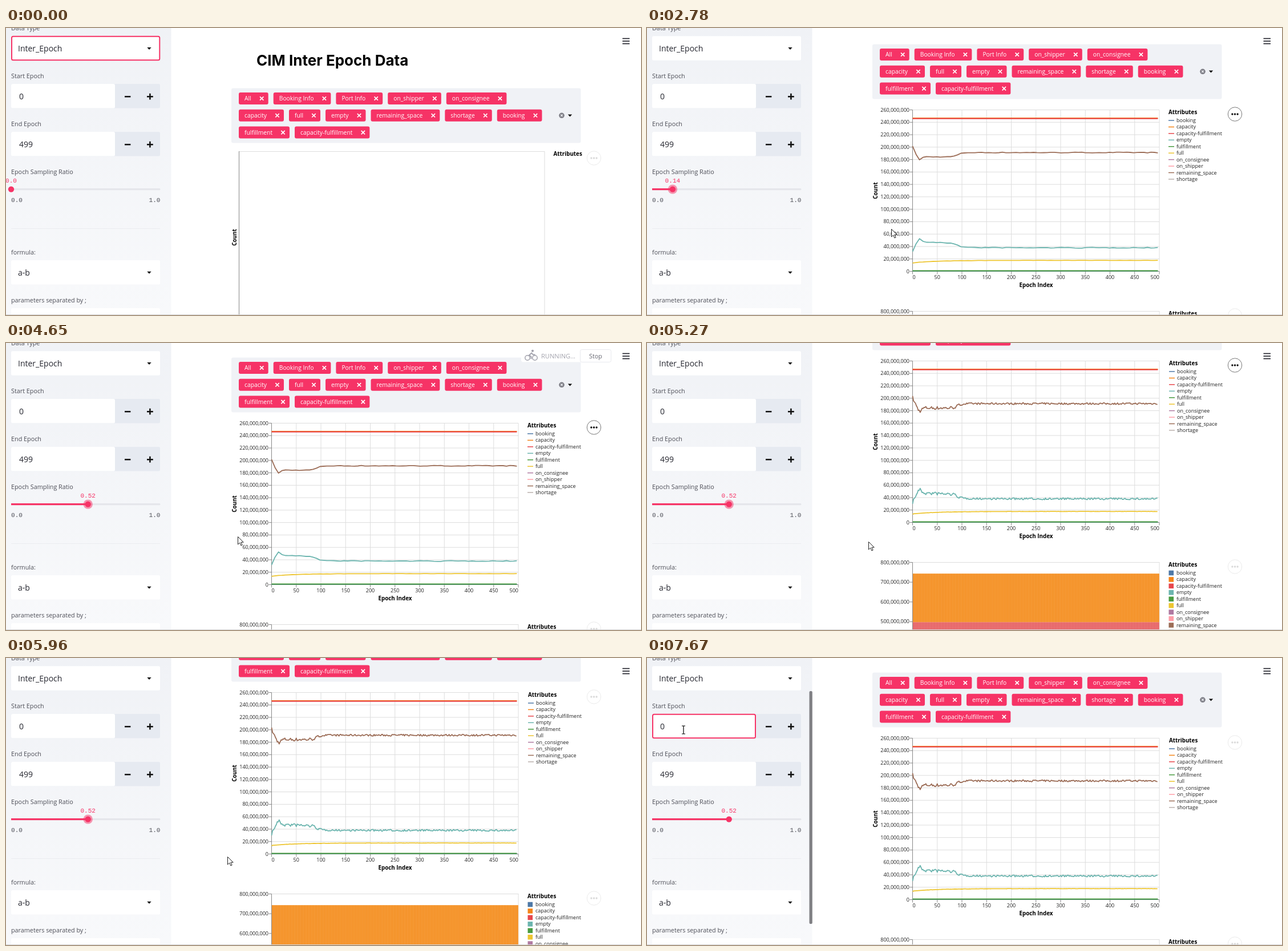
Write an HTML page that moves like this. It is 1113 by 503 pixels and loops after 8000 ms.

```html
<!DOCTYPE html>
<html lang="en">
<head>
<meta charset="utf-8">
<title>Epoch dashboard</title>
<style>
  html, body { margin: 0; width: 100%; height: 100%; overflow: hidden; background: #fff; }
  svg { display: block; width: 1113px; height: 503px; }
  text { font: 10.8px "Open Sans", sans-serif; fill: #262730; white-space: pre; }
  .title { font: 700 26px Inter, sans-serif; fill: #000; }
  .label { fill: #4d4e57; }
  .value { font-size: 14px; }
  .mono { font: 11.1px "Liberation Mono", monospace; fill: #4d4e57; }
  .chip { font-size: 10.3px; fill: #fff; }
  .tick { font-size: 9px; fill: #222; }
  .head { font-size: 9.8px; font-weight: 700; fill: #000; }
</style>
</head>
<body>
<svg id="stage" viewBox="0 0 1113 503"></svg>
<script>
const LOOP = 8000, RED = '#f63366', GREY = '#a3a3ad';
const stage = document.getElementById('stage');

const text = (x, y, s, cls, extra = '') => `<text x="${x}" y="${y}" class="${cls}" ${extra}>${s}</text>`;
const rect = (x, y, w, h, fill, r = 0, extra = '') =>
  `<rect x="${x}" y="${y}" width="${w}" height="${h}" rx="${r}" fill="${fill}" ${extra}/>`;
const path = (d, stroke, width = 1, extra = '') =>
  `<path d="${d}" fill="none" stroke="${stroke}" stroke-width="${width}" ${extra}/>`;
const circle = (x, y, r, fill, extra = '') => `<circle cx="${x}" cy="${y}" r="${r}" fill="${fill}" ${extra}/>`;
const group = (id, body) => `<g id="${id}">${body}</g>`;
const range = (n, f) => Array.from({ length: n }, (_, i) => f(i)).join('');
const down = (x, y) => `<path d="M${x - 3.7} ${y - 2}h7.4l-3.7 4z" fill="#111"/>`;
const cross = (x, y, r, color, width) => path(`M${x - r} ${y - r}l${2 * r} ${2 * r}m0-${2 * r}l-${2 * r} ${2 * r}`, color, width);
const middle = 'text-anchor="middle"', end = 'text-anchor="end"';

// ---- charts ----
const series = {
  booking: '#4e79a7', capacity: '#f58518', 'capacity-fulfillment': '#e8474c', empty: '#6cb5af', fulfillment: '#4a9c41',
  full: '#edc531', on_consignee: '#b07aa1', on_shipper: '#ff9da7', remaining_space: '#9c6d57', shortage: '#bab0ac'
};
const LEFT = 465.5, WIDTH = 432.5, TOP = 220.5, BASE = 503.5;
const px = i => LEFT + i * WIDTH / 500;
const py = v => BASE - v * (BASE - TOP) / 260;
const by = v => 573.5 + (800 - v) * 0.3465;

// Early spike and dip, then a step up to a plateau
const spaceAt = i => 191.3 - 7 / (1 + Math.exp((i - 92) / 5)) + 17 * Math.exp(-i / 7) - 7 * Math.exp(-(((i - 14) / 6) ** 2));
const fullAt = i => 17.7 - 4 * Math.exp(-i / 50);

function lines(step, early, late) {
  let seed = 7;
  const rand = () => (seed = seed * 16807 % 2147483647) / 2147483647 * 2 - 1;
  const d = { remaining_space: [], empty: [], full: [] };
  for (let i = 0; i < 498; i += step) {
    const full = fullAt(i) + rand() * 0.15;
    const space = spaceAt(i) + rand() * (i < 95 ? early : late);
    const add = (name, v) => d[name].push(px(i).toFixed(1) + ' ' + py(v).toFixed(1));
    add('full', full);
    add('remaining_space', space);
    add('empty', 247 - full - space);
  }
  const flat = (name, v) => path(`M${LEFT} ${py(v)}H${px(497)}`, series[name], 1.8);
  const curve = name => path('M' + d[name].join('L'), series[name], 1.8, 'stroke-linejoin="round"');
  return flat('booking', 0.6) + flat('capacity', 246.7) + flat('capacity-fulfillment', 246) + curve('empty')
    + flat('fulfillment', 0.9) + curve('full') + curve('remaining_space');
}

function legend(x, y, mark) {
  return text(x, y + 3.5, 'Attributes', 'head') + Object.entries(series).map(([name, color], i) => {
    const cy = y + 15 + i * 11.44;
    return mark(x, cy, color) + text(x + 14, cy + 3, name, 'tick');
  }).join('');
}
const dash = (x, y, color) => path(`M${x} ${y}h10`, color, 1.5);
const square = (x, y, color) => rect(x + 0.5, y - 4.3, 8.6, 8.6, color);

const axisY = (n, step, y) => range(n, i => path(`M460.5 ${y(i * step)}h5`, '#888')
  + text(460, y(i * step) + 3, i ? i * step + ',000,000' : '0', 'tick', end));
const axisX = range(11, i => path(`M${px(i * 50)} ${BASE}v5`, '#888')
  + text(px(i * 50), 516.5, i * 50, 'tick', i === 10 ? end : i ? middle : ''));
const grid = range(14, i => path(`M${LEFT} ${py(i * 20)}h${WIDTH}`, '#ddd'))
  + range(11, i => path(`M${px(i * 50)} ${TOP}V${BASE}`, '#ddd'));
const count = y => text(0, 0, 'Count', 'head', `${middle} transform="translate(403.5 ${y})rotate(-90)"`);

const plot = grid + axisY(14, 20, py) + axisX + path(`M${LEFT} ${TOP}V${BASE}h${WIDTH}`, '#888')
  + text(682, 530.5, 'Epoch Index', 'head', middle) + count(362);

// 260 thin bars drawn as one dashed line per layer
const bars = (high, low, soft, strong) => {
  const h = by(low) - by(high), d = `M${LEFT} ${by(high) + h / 2}h${WIDTH}`, pitch = WIDTH / 260;
  return path(d, soft, h) + path(d, strong, h, `stroke-dasharray="${pitch * 0.75} ${pitch * 0.25}"`);
};
const stack = rect(LEFT, by(800), WIDTH, 277, '#fff', 0, 'stroke="#ddd"')
  + bars(743, 497, '#f7ac58', '#f58f22') + bars(497, 250, '#ee8b8d', '#e76366')
  + axisY(9, 100, by) + path(`M${LEFT} ${by(800)}V${by(0)}`, '#888') + legend(914, 577, square);

const menu = (id, y) => group(id, circle(1030.5, y, 12.2, '#fff', 'stroke="#777"')
  + range(3, i => circle(1025.9 + i * 4.6, y, 1.7, '#111')));

const blank = rect(408.5, 216.5, 535.5, 320, '#fff', 0, 'stroke="#ddd"') + path('M408.5 216V520', '#888')
  + text(959.5, 224, 'Attributes', 'head') + count(367);

// ---- attribute picker: chips flow and wrap ----
const pen = document.createElement('canvas').getContext('2d');
pen.font = '10.3px "Open Sans", sans-serif';
function flow(names) {
  let x = 408, y = 123.5;
  return names.map(name => {
    const w = pen.measureText(name).width + 40;
    if (x + w > 945) { x = 408; y += 29.8; }
    const chip = rect(x, y - 10.5, w, 21, RED, 3) + text(x + 10, y + 3.5, name, 'chip') + cross(x + w - 11.5, y, 3.2, '#fff', 1.7);
    x += w + 9;
    return chip;
  }).join('');
}
const chips = flow(['All', 'Booking Info', 'Port Info', 'on_shipper', 'on_consignee', 'capacity', 'full', 'empty',
  'remaining_space', 'shortage', 'booking', 'fulfillment', 'capacity-fulfillment']);

const main = text(439, 66, 'CIM Inter Epoch Data', 'title')
  + rect(395, 105.5, 612.5, 96, '#f0f2f6', 3) + chips
  + circle(974, 153.3, 4.8, '#808088') + cross(974, 153.3, 1.8, '#f0f2f6', 1.1) + down(988.5, 153.5)
  + group('blank', blank)
  + group('data', plot + group('sparse', lines(7, 0.5, 0.6) + legend(914, 224, dash))
    + group('dense', lines(500 / 260, 2.6, 1.4) + legend(915, 224, dash)) + stack + menu('menu2', 581))
  + menu('menu', 228);

// ---- sidebar ----
const select = (y, s) => rect(9, y, 261, 42.5, '#fff', 2.5) + text(21, y + 26.5, s, 'value') + down(251, y + 21.7);
const stepper = (y, s) => rect(9, y, 261, 42.5, '#e6eaf1', 2.5) + rect(9, y, 182, 42.5, '#fff', 2.5)
  + text(23, y + 26.8, s, 'value') + path(`M208 ${y + 22.2}h10.4M247 ${y + 22.2}h10.8m-5.4-5.4v10.8`, '#111', 2.5);
const outline = (id, y, w) => group(id, rect(10, y + 0.8, w, 41.4, 'none', 2.5, `stroke="${RED}" stroke-width="2"`));

const sidebar = rect(0, 0, 289.5, 503, 'url(#shade)')
  + text(9, 4.3, 'Data Type', 'label') + select(14.3, 'Inter_Epoch') + outline('focusType', 14, 259.3)
  + text(9, 88, 'Start Epoch', 'label') + stepper(98, '0') + outline('focusStart', 98, 180)
  + group('caret', path('M30.5 110v19', '#111'))
  + text(9, 171.5, 'End Epoch', 'label') + stepper(182, '499')
  + text(9, 255.7, 'Epoch Sampling Ratio', 'label')
  + rect(9, 281, 261.5, 3.2, '#e5e6eb', 1.5) + rect(9, 281, 0, 3.2, RED, 0, 'id="fill"')
  + group('knob', circle(0, 282.6, 8.2, RED, 'id="halo"') + circle(0, 282.6, 5.2, RED)
    + text(0, 271, '', 'mono', `id="ratio" ${middle} style="fill:${RED}"`))
  + text(9, 305, '0.0', 'mono') + text(270.5, 305, '1.0', 'mono', end)
  + path('M9 351.5h261', '#ebecf0')
  + text(9, 396.5, 'formula:', 'label') + select(407, 'a-b')
  + text(9, 480.7, 'parameters separated by ;', 'label') + rect(9, 491, 261, 20, '#fff', 2.5)
  + group('bar', rect(284.5, 58, 5.3, 408, '#808084', 2));

// ---- header ----
const person = circle(920.5, 14.3, 2.2, GREY) + path('M912.5 18.3l6 1h4l6-1M919 19v12M922 19v12', GREY, 2.2);
const wheel = x => circle(x, 26, 4.2, 'none', `stroke="${GREY}" stroke-width="1.5"`);
const bike = wheel(914) + wheel(927) + circle(923, 13.8, 2.1, GREY) + path('M920.5 28v-4l-3.5-2.5 4-4 3 3h3.5', GREY, 1.9);
const header = group('run', rect(903, 0, 158, 33.5, '#fff', 4) + group('person', person) + group('bike', bike)
  + text(938, 27, 'RUNNING...', '', `style="font-size:11.1px;fill:${GREY}"`)
  + rect(1006.5, 11.5, 54, 22, '#fff', 3, 'stroke="#e8e9ee"') + text(1022, 26.5, 'Stop', '', 'style="fill:#666771"'))
  + range(3, i => path(`M1080.5 ${18.5 + i * 4.5}h12.5`, '#262730', 1.7));

// ---- pointer ----
const fingers = (color, grow) => path('M-3 5l-3-5M-2 2l-1.5-7M.5 2v-8.5M3 2l.6-7.5M4.5 3l1.8-5', color, 2.2 + grow * 2, 'stroke-linecap="round"')
  + circle(0.8, 3.6, 4 + grow, color);
const pointer = group('pointer',
  group('arrow', path('M.5 .5V14l3.2-3 2.2 5 2.2-1-2.2-4.8h4.3z', '#222', 1, 'style="fill:#fff"'))
  + group('hand', fingers('#000', 1) + fingers('#fff', 0))
  + group('beam', path('M-3-7h6M-3 7h6M0-7v14', '#000', 1.2)));

stage.innerHTML = `<defs><linearGradient id="shade" x2="0" y2="1">
  <stop stop-color="#f0f2f6"/><stop offset="1" stop-color="#f8f9fb"/></linearGradient></defs>`
  + rect(0, 0, 1113, 503, '#fff') + group('main', main) + sidebar + header
  + path('M0 502.5h1113', '#d6d6d8') + pointer;

const el = {};
stage.querySelectorAll('[id]').forEach(n => el[n.id] = n);

// ---- timeline ----
function ramp(t, from, to) {
  const k = Math.min(1, Math.max(0, (t - from) / (to - from)));
  return k * k * (3 - 2 * k);
}
const pulse = (t, from, to, hold = 0, fade = 150) => ramp(t, from, to) - ramp(t, to + hold, to + hold + fade);

// Pointer moves: start, end, x, y
const moves = [
  [150, 900, 54, 272], [1000, 1620, 44, 278], [2010, 2470, 428, 352], [2850, 3400, 92, 290], [3450, 3620, 150, 289],
  [4170, 4640, 406, 339], [4880, 5200, 388, 348], [6360, 7050, 64, 126]];
const pointerAt = t => moves.reduce(([x, y], [from, to, nx, ny]) => {
  const k = ramp(t, from, to);
  return [x + (nx - x) * k, y + (ny - y) * k];
}, [440, 500]);

// Each wheel notch scrolls 80px
const scrollAt = t => Math.round(80 * (ramp(t, 2600, 2805) + ramp(t, 4950, 5180) + ramp(t, 5190, 5390)
  - ramp(t, 5780, 5950) - ramp(t, 5970, 6190)));

const show = (id, on) => el[id].style.opacity = +on;
const move = (id, x, y) => el[id].setAttribute('transform', `translate(${x} ${y})`);

function draw(t) {
  const [x, y] = pointerAt(t);
  move('main', 0, -scrollAt(t));

  const loaded = t >= 2240, dense = t >= 4880;
  show('blank', !loaded);
  show('data', loaded);
  show('sparse', !dense);
  show('dense', dense);
  show('menu', 0.15 + 0.85 * (pulse(t, 150, 280, 240) + pulse(t, 2330, 2450, 480) + pulse(t, 4540, 4640, 720)));
  show('menu2', 0.15);

  const ratio = t < 1450 ? 0 : t < 3790 ? 0.14 : 0.52;
  const knob = ratio ? 8.5 + ratio * 260 : 9;
  move('knob', knob, 0);
  el.fill.setAttribute('width', knob - 9);
  el.ratio.textContent = ratio ? ratio.toFixed(2) : '0.0';
  show('halo', t >= 1450 && t < 7130 ? 0.5 : 0);

  show('focusType', 1 - ramp(t, 1450, 1620));
  show('focusStart', ramp(t, 7100, 7290));
  show('caret', t >= 7140 && t < 7670);
  show('bar', t >= 150 && x < 289);

  show('run', pulse(t, 1900, 2070, 230) + pulse(t, 4300, 4600, 280));
  show('person', t < 3000);
  show('bike', t >= 3000);

  const onTrack = x < 280 && y > 258 && y < 300;
  const onField = x > 9 && x < 191 && (y > 98 && y < 140 || y > 182 && y < 224);
  move('pointer', x, y);
  show('pointer', t >= 150);
  show('hand', onTrack);
  show('beam', onField);
  show('arrow', !onTrack && !onField);
}

const start = performance.now();
function tick() {
  draw((performance.now() - start) % LOOP);
  requestAnimationFrame(tick);
}
tick();
</script>
</body>
</html>
```
